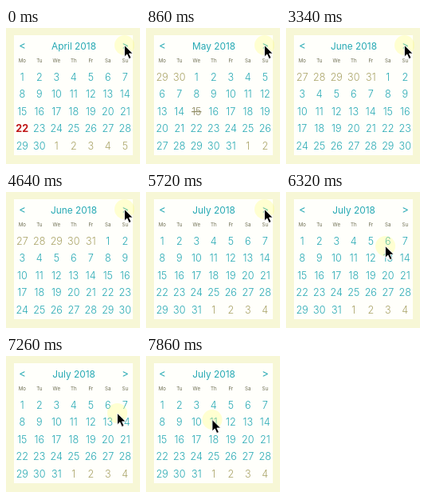
Recreate the animation shown at these times as an HTML page. Size 168 by 170 pixels, loop 8 s.

```html
<!DOCTYPE html>
<html lang="en">
<head>
<meta charset="utf-8">
<title>Calendar</title>
<style>
html, body { margin: 0; width: 100%; height: 100%; overflow: hidden; background: #fff; }
svg { display: block; width: 100vw; height: 100vh; }
text { font-family: Inter, Roboto, sans-serif; text-anchor: middle; fill: #26a9b4; }
.title { font-size: 11.9px; }
.nav { font-size: 13px; }
.week { font-size: 6.2px; fill: #6c6c50; }
.day { font-size: 12.6px; font-weight: 300; }
.out { fill: #aaa468; }
.today { fill: #c01818; font-weight: 700; }
.off { fill: #8f8b62; text-decoration: line-through; }
</style>
</head>
<body>
<svg id="stage" viewBox="0 0 168 170">
  <rect width="168" height="170" fill="#f7f7d6"/>
  <rect x="10" y="9" width="149" height="150" fill="#fffffb"/>
  <g id="frame"></g>
  <g id="months"></g>
  <g id="cursor">
    <circle r="12.5" fill="#ffff70" opacity=".3"/>
    <path d="M0 0V14.5L3.3 11.4L5.8 17L8.4 15.8L5.9 10.5H10.5Z" fill="#000" stroke="#fff" stroke-width=".8"/>
  </g>
</svg>
<script>
const NS = "http://www.w3.org/2000/svg";
const LOOP = 8000, FADE = 520;
const $ = id => document.getElementById(id);
const colX = c => 20.3 + c * 21.5;
const rowY = r => 65.6 + r * 21.5;

function label(parent, str, x, y, cls) {
  const el = document.createElementNS(NS, "text");
  el.textContent = str;
  el.setAttribute("x", x);
  el.setAttribute("y", y);
  el.setAttribute("class", cls);
  parent.append(el);
}

label($("frame"), "<", 20.5, 27, "nav");
label($("frame"), ">", 149.5, 27, "nav");
["Mo", "Tu", "We", "Th", "Fr", "Sa", "Su"].forEach((d, i) =>
  label($("frame"), d, colX(i), 42.8, "week"));

// lead: days shown from the previous month
const months = [
  { name: "April 2018", start: -1000, lead: 0, prev: 31, days: 30, today: 22 },
  { name: "May 2018", start: 260, lead: 2, prev: 30, days: 31, off: 15 },
  { name: "June 2018", start: 2690, lead: 5, prev: 31, days: 30 },
  { name: "July 2018", start: 5150, lead: 0, prev: 30, days: 31 }
];

for (const m of months) {
  m.group = document.createElementNS(NS, "g");
  $("months").append(m.group);
  label(m.group, m.name, 85, 27, "title");
  for (let i = 0; i < 35; i++) {
    const n = i - m.lead + 1;
    const outside = n < 1 || n > m.days;
    const day = n < 1 ? m.prev + n : n > m.days ? n - m.days : n;
    const cls = outside ? "out" : n === m.today ? "today" : n === m.off ? "off" : "";
    label(m.group, day, colX(i % 7), rowY(Math.floor(i / 7)), "day " + cls);
  }
}

// time, x, y of the pointer tip
const path = [
  [0, 148.5, 21.5], [6000, 148.5, 21.5], [6260, 128, 62], [6540, 100, 108],
  [6740, 94, 102], [6920, 108, 112], [7180, 142, 80], [7400, 134, 52],
  [7660, 116, 90], [7850, 83, 79.5], [8000, 83, 79.5]
];
const ease = u => u * u * (3 - 2 * u);
const clamp = u => Math.max(0, Math.min(1, u));

function pointer(t) {
  const i = path.findIndex((p, k) => k > 0 && t <= p[0]);
  const a = path[i - 1], b = path[i];
  const u = ease((t - a[0]) / (b[0] - a[0]));
  return [a[1] + (b[1] - a[1]) * u, a[2] + (b[2] - a[2]) * u];
}

function draw(t) {
  const fades = months.map(m => 1 - (1 - clamp((t - m.start) / FADE)) ** 2);
  months.forEach((m, i) => {
    const after = i + 1 < months.length ? fades[i + 1] : 0;
    m.group.setAttribute("opacity", fades[i] * (1 - after));
  });
  $("cursor").setAttribute("transform", `translate(${pointer(t)})`);
}

function tick(now) {
  draw(now % LOOP);
  requestAnimationFrame(tick);
}
draw(0);
requestAnimationFrame(tick);
</script>
</body>
</html>
```
